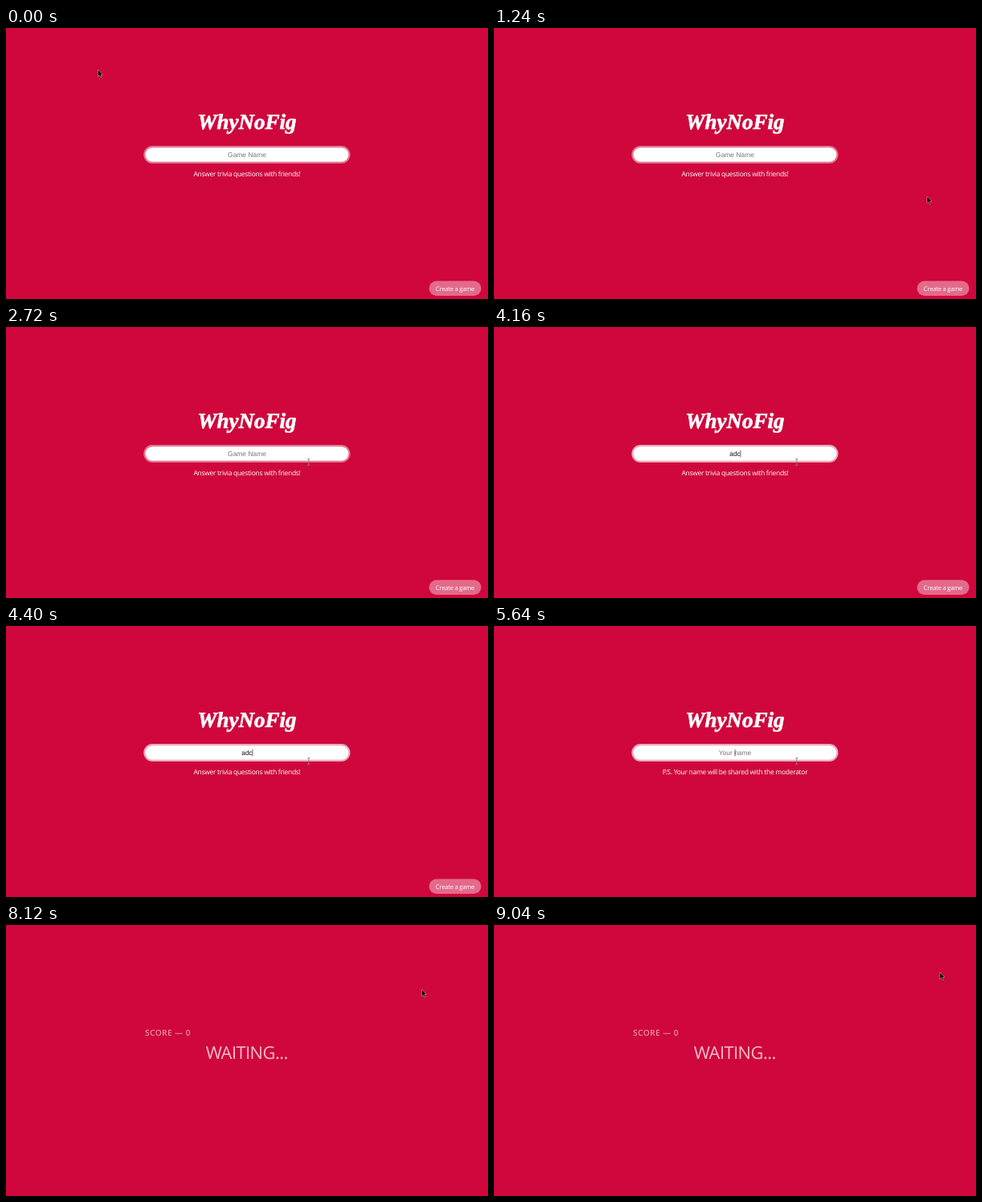
Recreate the animation shown at these times as an HTML page. Size 600 by 338 pixels, loop 9080 ms.

```html
<!DOCTYPE html>
<html lang="en">
<head>
<meta charset="utf-8">
<title>Trivia game</title>
<style>
  html, body { margin: 0; width: 100%; height: 100%; overflow: hidden; background: #cf073c; }
  svg { display: block; width: 100vw; height: 100vh; }
  text {
    font-family: "Open Sans", "Noto Sans", sans-serif; fill: #fff;
    text-anchor: middle; text-rendering: geometricPrecision;
  }
  #title { font: italic bold 27px "Lobster", "Liberation Serif", serif; stroke: #fff; stroke-width: .7; }
  #hint { font-size: 8.5px; font-weight: 500; letter-spacing: -.29px; }
  #create text { font-size: 7.7px; letter-spacing: -.26px; }
  #entry { font: 8.45px "Liberation Sans", Arial, sans-serif; }
  #score { font-size: 10.2px; font-weight: 600; letter-spacing: .4px; text-anchor: start; opacity: .55; }
  #waiting { font-size: 21.8px; letter-spacing: -.5px; opacity: .74; }
</style>
</head>
<body>
<svg viewBox="0 0 600 338">
  <rect width="600" height="338" fill="#cf073c"/>
  <g id="form">
    <text id="title" x="300" y="125.5">WhyNoFig</text>
    <rect id="ring" x="171.3" y="147" width="257.2" height="22" rx="11" fill="#f3eeee"/>
    <rect x="173.5" y="149.2" width="252.8" height="17.6" rx="8.8" fill="#fff"/>
    <text id="entry" x="300" y="161"></text>
    <path id="caret" d="M0 153.6V162.4" stroke="#111" stroke-width=".6"/>
    <text id="hint" x="300" y="184.8"></text>
    <g id="create">
      <rect x="526.6" y="315.6" width="65" height="18.4" rx="9.2" fill="#fff" fill-opacity=".4"/>
      <text x="559" y="327.6">Create a game</text>
    </g>
  </g>
  <g id="lobby">
    <text id="score" x="173" y="138.4">SCORE — 0</text>
    <text id="waiting" x="299.8" y="166.6">WAITING...</text>
  </g>
  <path id="arrow" d="M0 0V8.4L1.9 6.7 3.3 9.8 4.7 9.2 3.4 6.1H6Z" fill="#000" stroke="#e9a0b4" stroke-width=".55"/>
  <path id="beam" d="M-1.6 -3.8H1.6M0 -3.8V3.8M-1.6 3.8H1.6" fill="none" stroke="#8a8284" stroke-width=".9"/>
</svg>
<script>
const LOOP = 9080, STEP = 40;
const LOBBY_AT = 7320;

const screens = [
  { start: 0, focus: 3720, placeholder: "Game Name", hint: "Answer trivia questions with friends!",
    value: "adc", keys: [3800, 3960, 4120] },
  { start: 4600, focus: 4640, placeholder: "Your name", hint: "P.S. Your name will be shared with the moderator",
    value: "nup", keys: [6640, 6840, 7040] }
];

// Pointer stops: time, x, y
const stops = [
  [0, 114.5, 52], [1080, 539, 210], [1640, 539, 210], [2520, 376.8, 168.5],
  [7400, 376.8, 168.5], [8280, 531, 72], [9000, 555, 59]
];

const $ = id => document.getElementById(id);
const show = (id, on) => $(id).setAttribute("display", on ? "inline" : "none");
const ease = p => p * p * (3 - 2 * p);

function pointerAt(t) {
  const next = stops.findIndex(s => s[0] > t);
  if (next < 0) return stops[stops.length - 1].slice(1);
  const [t0, x0, y0] = stops[next - 1], [t1, x1, y1] = stops[next];
  const p = ease((t - t0) / (t1 - t0));
  return [x0 + (x1 - x0) * p, y0 + (y1 - y0) * p];
}

function drawForm(t) {
  const screen = screens[t < screens[1].start ? 0 : 1];
  const typed = screen.keys.filter(k => k <= t).length;
  const focused = t >= screen.focus;
  const entry = $("entry");

  entry.textContent = typed ? screen.value.slice(0, typed) : screen.placeholder;
  entry.style.fill = typed ? "#111" : "#757575";
  $("hint").textContent = screen.hint;
  $("ring").setAttribute("fill-opacity", focused ? .72 : .5);
  show("create", screen === screens[0]);

  // The caret restarts its blink with every key
  const since = t - (typed ? screen.keys[typed - 1] : screen.focus);
  show("caret", focused && since % 1000 < 500);
  const caretX = typed ? 300 + entry.getComputedTextLength() / 2 + .1 : 300;
  $("caret").setAttribute("transform", `translate(${caretX} 0)`);
}

function render(time) {
  const t = Math.floor((time % LOOP) / STEP) * STEP;
  const inLobby = t >= LOBBY_AT;
  show("form", !inLobby);
  show("lobby", inLobby);
  if (!inLobby) drawForm(t);

  const [x, y] = pointerAt(t);
  const overField = t < 7400 && x > 172 && x < 428 && y > 147 && y < 169;
  show("arrow", !overField);
  show("beam", overField);
  $(overField ? "beam" : "arrow").setAttribute("transform", `translate(${x} ${y})`);
}

const origin = performance.now();
function tick() {
  render(performance.now() - origin);
  requestAnimationFrame(tick);
}
tick();
</script>
</body>
</html>
```
